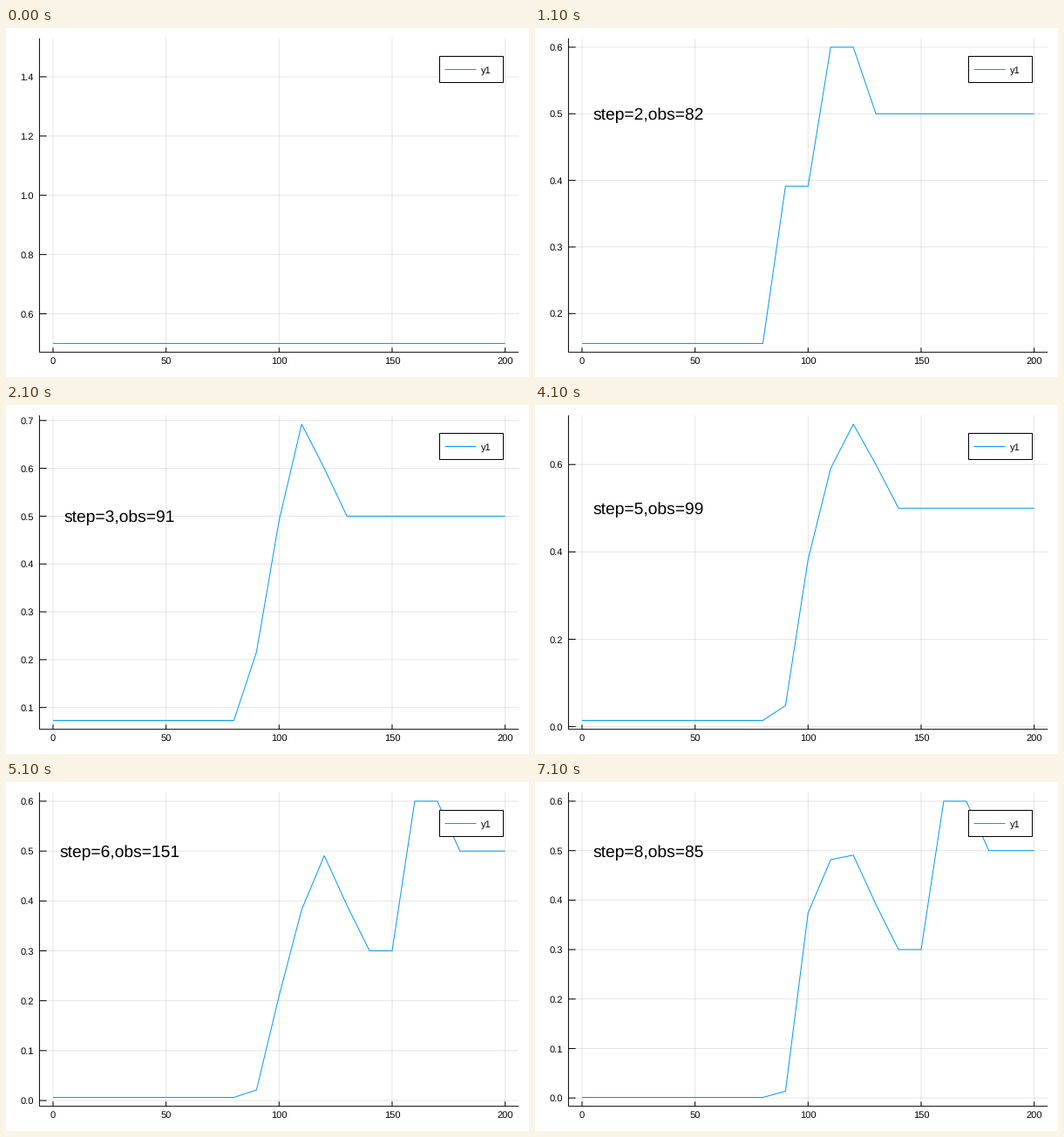
A matplotlib script that plays this animation: 600 by 400 pixels, repeating every 8000 ms.

```python
import numpy as np
import matplotlib.pyplot as plt
from matplotlib.animation import ArtistAnimation
from matplotlib.patches import Rectangle

plt.rcParams["font.family"] = "Liberation Sans"
plt.rcParams["text.hinting"] = "none"
plt.rcParams["path.snap"] = False  # keep lines at fractional pixels

PX = 0.72  # one pixel in points at 100 dpi
LEFT, RIGHT, TOP, BOTTOM = 38.4, 588.2, 11.8, 371.7
PAD = 0.03 / 1.06
BLUE = "#009afa"

CELLS = np.arange(0, 201, 10)
READINGS = [105, 82, 91, 115, 99, 151, 95, 85]
FREE_ODDS, HIT_ODDS = 0.3 / 0.7, 0.6 / 0.4
HIT_DEPTH = 20

fig = plt.figure(figsize=(6, 4), dpi=100, facecolor="white")
ax = fig.add_axes([0, 0, 1, 1])
ax.set_xlim(0, 600)
ax.set_ylim(400, 0)
ax.axis("off")


def to_x(value):
    width = RIGHT - LEFT
    return LEFT + width * (PAD + value / 200 / 1.06)


def y_scale(low, high):
    height = BOTTOM - TOP
    return lambda v: BOTTOM - height * (PAD + (v - low) / (high - low) / 1.06)


def line(xs, ys, color="black", z=3, **kw):
    return ax.plot(xs, ys, color=color, lw=PX, zorder=z, snap=False,
                   solid_capstyle="butt", **kw)[0]


def grid_line(xs, ys):
    return line(xs, ys, z=1, alpha=0.1)


def label(x, y, text, size=8, ha="center"):
    return ax.text(x, y, text, fontsize=size, ha=ha, va="baseline", zorder=6)


def draw_frame_parts():
    line([LEFT, LEFT], [TOP, BOTTOM])
    line([LEFT, RIGHT], [BOTTOM, BOTTOM])
    for value in range(0, 201, 50):
        x = to_x(value)
        grid_line([x, x], [TOP, BOTTOM])
        line([x, x], [BOTTOM, BOTTOM - 5.4])
        label(x, 385, str(value))
    ax.add_patch(Rectangle((497.5, 32.5), 73, 30, fc="white", ec="black",
                           lw=PX, zorder=4, snap=False))
    line([503.5, 539.5], [47.5, 47.5], BLUE, z=5)
    label(545, 51.5, "y1", ha="left")


def occupancy(step):
    """Probability that each cell is occupied after the first readings."""
    odds = np.ones(len(CELLS))
    for obs in READINGS[:step]:
        odds[CELLS < obs] *= FREE_ODDS
        odds[(CELLS >= obs) & (CELLS < obs + HIT_DEPTH)] *= HIT_ODDS
    return odds / (1 + odds)


def build_scene(step):
    probs = occupancy(step)
    low, high = probs.min(), probs.max()
    if low == high:
        high = low + 1
    span = high - low
    to_y = y_scale(low, high)

    parts = [line(to_x(CELLS), to_y(probs), BLUE, z=2)]
    gap = 0.2 if span > 0.67 else 0.1
    for k in range(16):
        value = k * gap
        if not low - 0.03 * span <= value <= high + 0.03 * span:
            continue
        y = to_y(value)
        parts += [grid_line([LEFT, RIGHT], [y, y]),
                  line([LEFT, LEFT + 8.2], [y, y]),
                  label(31.6, y + 4, f"{value:.1f}", ha="right")]
    if step:
        text = f"step={step},obs={READINGS[step - 1]}"
        parts.append(label(130, to_y(0.5) + 7, text, size=13.9))
    return parts


draw_frame_parts()
scenes = [build_scene(step) for step in range(len(READINGS) + 1)]
# The blank prior shows for one tick, then each reading holds for ten.
frames = [scenes[(i + 9) // 10] for i in range(80)]
anim = ArtistAnimation(fig, frames, interval=100, repeat=True, repeat_delay=0)
plt.show()
```
